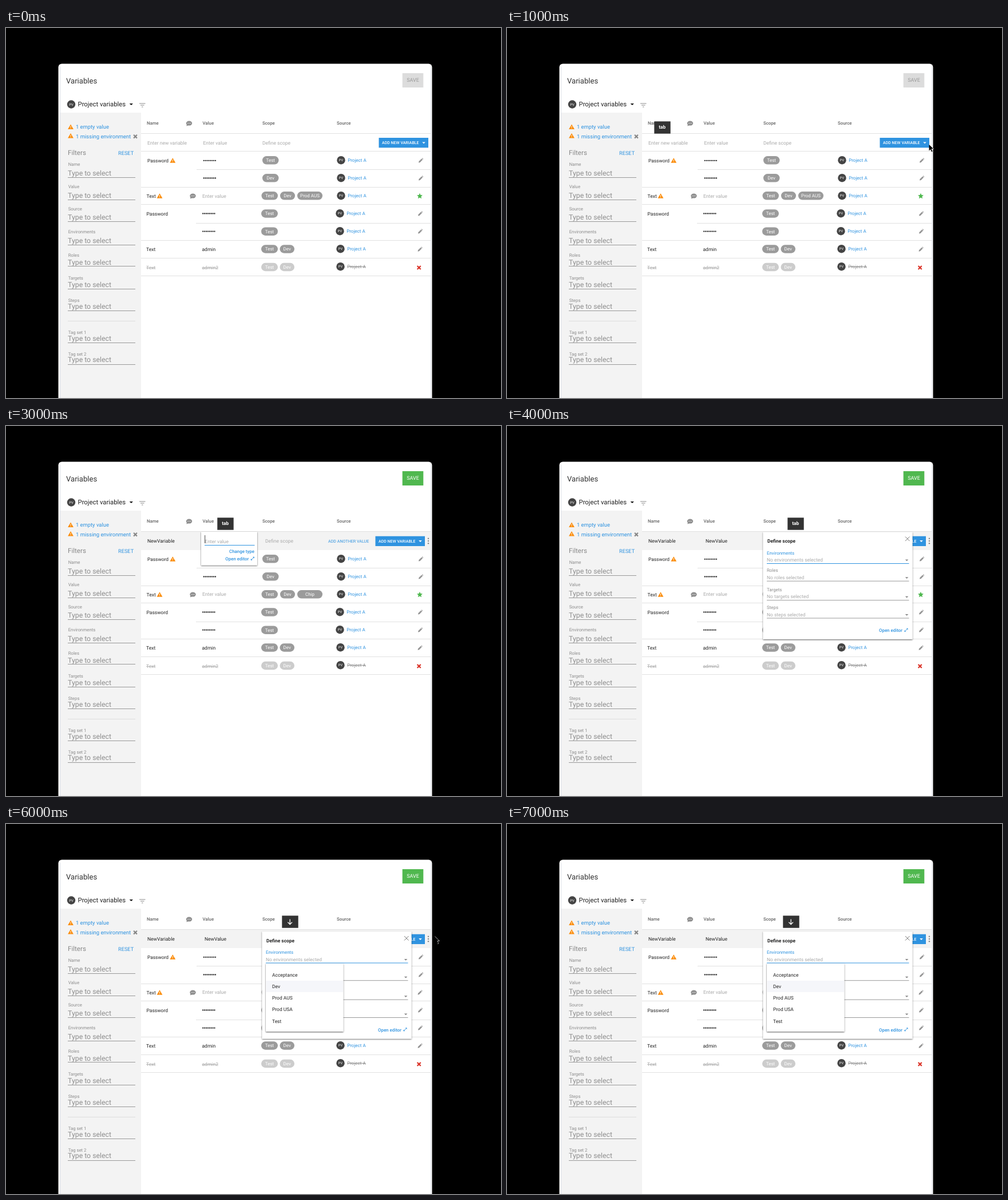
These frames come from a looping animation (865x647 px, 8 s). An HTML page:

```html
<!DOCTYPE html>
<html lang="en">
<head>
<meta charset="utf-8">
<title>Variables</title>
<style>
html, body { margin: 0; width: 100%; height: 100%; overflow: hidden; background: #000; }
svg { display: block; width: 865px; height: 647px; font-family: Roboto, sans-serif; }
text { text-rendering: geometricPrecision; }
</style>
</head>
<body>
<svg id="stage" viewBox="0 0 865 647"></svg>
<script>
const BLUE = '#2f93e0', INK = '#333', GREY = '#9b9b9b', PALE = '#aaa', RULE = '#e1e1e1';
const LOOP = 8000, STEP = 1000;

// Drawing helpers, all returning SVG markup
const text = (x, y, s, size = 8.5, fill = '#222', extra = '') =>
  `<text x="${x}" y="${y}" font-size="${size}" fill="${fill}" ${extra}>${s}</text>`;
const rect = (x, y, w, h, fill, extra = '') =>
  `<rect x="${x}" y="${y}" width="${w}" height="${h}" fill="${fill}" ${extra}/>`;
const path = (d, fill, extra = '') => `<path d="${d}" fill="${fill}" ${extra}/>`;
const stroke = (d, color, w = 1) => path(d, 'none', `stroke="${color}" stroke-width="${w}"`);
const rule = (x1, x2, y, color = RULE) => stroke(`M${x1} ${y}H${x2}`, color);
const dot = (x, y, r, fill) => `<circle cx="${x}" cy="${y}" r="${r}" fill="${fill}"/>`;
const move = (x, y, s) => `<g transform="translate(${x} ${y})">${s}</g>`;
const during = (from, to, s) => `<g data-from="${from}" data-to="${to}">${s}</g>`;
const MEDIUM = 'font-weight="500"', BOLD = 'font-weight="700"', MID = 'text-anchor="middle" ';
const SHADOW = 'filter="url(#shadow)"';

// Icons
const caret = (x, y, w, fill) => path(`M${x - w} ${y - w / 2}h${2 * w}l${-w} ${w}z`, fill);
const cross = (x, y, r, color, w) =>
  stroke(`M${x - r} ${y - r}l${2 * r} ${2 * r}m0 ${-2 * r}l${-2 * r} ${2 * r}`, color, w);
const warning = (x, y) => move(x, y,
  path('M0-4.4L4.9 4H-4.9z', '#fb8c0a') + stroke('M0-1.6V1.3M0 2V2.9', '#fff', .9));
const comment = (x, y) => move(x, y,
  `<ellipse cy="-.4" rx="5.2" ry="4" fill="#8f8f8f"/>` + path('M-4 1L-4.6 4.4L-1 3z', '#8f8f8f') +
  [-2.3, 0, 2.3].map(i => dot(i, -.4, .7, '#fff')).join(''));
const pencil = (x, y) => move(x, y,
  path('M-4 4L-3.4 1.5L1.2-3.1L3.1-1.2L-1.5 3.4zM1.8-3.7L2.6-4.3L4.3-2.6L3.7-1.8z', '#8f8f8f') +
  stroke('M-2.4 1.9L1.4-1.9', '#bbb', .5));
const star = (x, y) => {
  const pts = Array.from({ length: 10 }, (_, i) => {
    const r = i % 2 ? 2.4 : 5.2, a = i * Math.PI / 5;
    return (x + r * Math.sin(a)).toFixed(1) + ',' + (y - r * Math.cos(a)).toFixed(1);
  });
  return `<polygon points="${pts.join(' ')}" fill="#4fb84f"/>`;
};
const expand = (x, y) => move(x, y,
  path('M.3-3H3V-.3zM-.3 3H-3V.3z', BLUE) + stroke('M-2.2 2.2L2.2-2.2', BLUE, 1));
const badge = (x, y) => dot(x, y, 7.2, '#444') + text(x, y + 2.1, 'PV', 5.8, '#fff', MID);
const dots = (x, y) =>
  Array.from({ length: 8 }, (_, i) => dot(x + 1.2 + i * 2.9, y, 1.15, '#222')).join('');
const chip = (x, y, w, s, fill = GREY) =>
  rect(x, y - 7.2, w, 14.4, fill, 'rx="7.2"') + text(x + w / 2, y + 2.9, s, 8, '#fff', MID);
const key = (x, s, y = 160) =>
  rect(x + .3, y + .3, 28.4, 21.4, '#333') +
  (s ? text(x + 14.2, y + 13.4, s, 8.4, '#fff', MID + BOLD)
     : stroke(`M${x + 14.2} ${y + 6.5}v9m-3.8-3.8l3.8 3.8l3.8-3.8`, '#fff', 1.3));
const pointer = (x, y) => move(x, y,
  path('M0 0V11L2.6 8.7L4.6 13.2L6.4 12.4L4.4 8H8z', '#000') +
  stroke('M0 0L8 8H4.4L6.4 12.4L4.6 13.2', '#ccc', .8));

function shell() {
  const save = (bg, fg) => rect(692.7, 79, 36.6, 25, bg) + text(711, 94.4, 'SAVE', 9, fg, MID);
  return rect(91.5, 62.5, 653, 600, '#fff', 'rx="6"') +
    stroke('M94.5 68V647M742.5 68V647', '#dfe4ec') +
    rect(95, 148, 141, 499, '#f3f3f3') +
    text(105, 96.9, 'Variables', 13.1, INK) +
    during(0, 3, save('#dcdcdc', '#999')) + during(3, 8, save('#50b84f', '#fff')) +
    badge(114, 133.5) + text(125.5, 137.2, 'Project variables', 11.3, '#222') +
    caret(218.8, 133.5, 3.2, '#111') +
    stroke('M233 132H243.5M235 135H241.5M237 138H239.5', '#888', 1.1);
}

function sidebar() {
  const fields = [
    ['Name', 238, 254, 261.5], ['Value', 277.5, 293, 300.5], ['Source', 316, 331, 338.5],
    ['Environments', 356, 371.5, 379.5], ['Roles', 397.5, 409.5, 416.5],
    ['Targets', 437.5, 448.5, 456.5], ['Steps', 476, 487, 494.5],
    ['Tag set 1', 532, 543, 550.5], ['Tag set 2', 570, 580, 588.5]];
  return warning(113, 173) + text(122, 176.4, '1 empty value', 9.4, BLUE) +
    warning(113, 188.5) + text(122, 192.7, '1 missing environment', 9.5, BLUE) +
    cross(226, 189.7, 2.9, '#888', 2.2) +
    text(108, 222, 'Filters', 11.6, '#888') + text(196, 221.5, 'RESET', 9.2, BLUE) +
    rule(108, 226, 512.5, '#ddd') +
    fields.map(([name, a, b, c]) => text(108.7, a + 2.8, name, 7.8, '#8c8c8c') +
      text(108, b + 4, 'Type to select', 12.3, '#8f8f8f') +
      rule(108, 226, c, '#999')).join('');
}

function entryRow() {
  const button = (x, y) => rect(x, y, 86.5, 17.3, BLUE) +
    text(x + 5.5, y + 11.2, 'ADD NEW VARIABLE', 7, '#fff', MEDIUM) +
    caret(x + 78.5, y + 8.8, 2.8, '#fff');
  const hint = (x, s) => text(x, 204.3, s, 8.5, PALE);
  const heads = [[246, 'Name'], [343.5, 'Value'], [448, 'Scope'], [578, 'Source']];
  return heads.map(([x, s]) => text(x, 169.2, s, 7.8, '#666', MEDIUM)).join('') +
    comment(320, 167) +
    during(0, 2, hint(247, 'Enter new variable') + hint(344.5, 'Enter value') +
      hint(448, 'Define scope') + button(651.5, 192)) +
    during(2, 8, rect(236, 185, 506, 32, '#f3f3f3') + button(645.5, 192.7) +
      [196.8, 201, 205.2].map(y => dot(738, y, 1.2, '#888')).join('')) +
    during(2, 4, hint(453, 'Define scope') +
      text(563, 203.7, 'ADD ANOTHER VALUE', 7.15, BLUE)) +
    during(2, 3, hint(347, 'Enter value')) +
    during(3, 8, text(247, 204.3, 'NewVariable', 8.5)) +
    during(4, 8, text(347, 204.3, 'NewValue', 8.5)) +
    rule(236, 742, 184.5);
}

function rows() {
  const sources = [585.5, 585.5, 585.5, 583.5, 583.5, 584.5, 584.5];
  const struck = 'text-decoration="line-through"';
  const pair = (y, fill) => chip(446, y, 29, 'Test', fill) + chip(478.5, y, 25.5, 'Dev', fill);
  const lines = [[236, 215.5], [333, 247.5], [236, 278.5], [236, 308.5], [332, 341.5],
    [236, 371.5], [236, 402.5], [236, 433.5]];
  return lines.map(([x, y]) => rule(x, 742, y)).join('') +
    sources.map((x, i) => {
      const y = 231.2 + 31 * i, gone = i === 6;
      return badge(x, y) + text(x + 11.7, y + 2.6, 'Project A', 8, gone ? '#888' : BLUE, gone ? struck : '');
    }).join('') +
    text(247, 235.3, 'Password', 8.4) + warning(291.3, 231.7) +
    text(245.5, 297, 'Text', 8.5) + warning(268.5, 293.7) + comment(326.5, 294) +
    text(245.5, 328, 'Password', 8.5) + text(245, 390.3, 'Text', 8.5) +
    text(245, 422, 'Text', 8.5, PALE, struck) +
    dots(344.5, 231.8) + dots(344.5, 262.5) + dots(343, 324.5) + dots(343, 355.7) +
    text(342.5, 390.3, 'admin', 8.5) + text(342.5, 422, 'admin2', 8.5, PALE, struck) +
    chip(448, 231.3, 28.5, 'Test') + chip(448, 262.3, 28.5, 'Dev') +
    chip(446.5, 293.3, 28.5, 'Test') + chip(479, 293.3, 26, 'Dev') +
    during(0, 3, chip(509, 293.3, 44, 'Prod AUS')) + during(3, 8, chip(509, 293.3, 44, 'Chip')) +
    chip(446, 324.5, 29, 'Test') + chip(446, 355.7, 29, 'Test') +
    pair(386.5) + pair(418, '#ccc') +
    pencil(725, 231.5) + pencil(725, 262.5) +
    during(0, 5, star(723, 294)) + during(5, 8, pencil(723.5, 293.5)) +
    pencil(724, 324.5) + pencil(724, 355.5) + pencil(723.5, 386.8) +
    cross(721.7, 419, 3, '#db3328', 2.3);
}

function editor(x, h, hint) {
  return rect(x, 185, 98, h, '#fff', SHADOW) +
    text(x + 6.3, 204.5, hint, 8.5, PALE) + rule(x + 6, x + 93.5, 208.5, BLUE) +
    stroke(`M${x + 6.7} 191V205`, '#444', 1);
}
const openEditor = (x, y) => text(x, y, 'Open editor', 7.9, BLUE, MEDIUM) + expand(x + 47.5, y - 3.2);

function scopePanel() {
  const fields = [['Environments', 224.5], ['Roles', 255.2], ['Targets', 288.7], ['Steps', 320]];
  return rect(447.5, 185.5, 261, 187.5, '#fff', SHADOW) +
    text(455, 204, 'Define scope', 8.4, '#222', BOLD) + cross(699.8, 197.3, 3.8, '#777', 1) +
    fields.map(([name, y], i) =>
      text(454, y, name, 7.9, i ? '#8c8c8c' : BLUE) +
      text(454, y + 12.6, `No ${name.toLowerCase()} selected`, 8.45, PALE) +
      rule(454, 702.5, y + 16, i ? '#999' : BLUE) + caret(698.6, y + 10.4, 2.8, '#888')).join('') +
    openEditor(650, 360);
}

function menu() {
  const names = ['Acceptance', 'Dev', 'Prod AUS', 'Prod USA', 'Test'];
  return rect(454, 244, 135.5, 119, '#fff', SHADOW) +
    during(6, 8, rect(454.5, 274, 134.5, 20, '#f5f6fa')) +
    names.map((s, i) => text(465, 266.8 + 20.2 * i, s, 8.45)).join('');
}

const stage = document.getElementById('stage');
stage.innerHTML =
  `<defs><filter id="shadow" x="-10%" y="-10%" width="120%" height="125%">
    <feDropShadow dx="0" dy="1" stdDeviation="1.1" flood-color="#000" flood-opacity=".65"/>
  </filter></defs>` +
  rect(0, 0, 865, 647, '#000') + shell() + sidebar() +
  `<g id="rows">${rows()}</g>` + text(343, 296.5, 'Enter value', 8.5, PALE) + entryRow() +
  during(2, 3, editor(241, 40, 'Enter name') + openEditor(281.7, 220)) +
  during(3, 4, editor(341, 58.5, 'Enter value') +
    text(390, 222.3, 'Change type', 7.9, BLUE, MEDIUM) + openEditor(383.3, 235)) +
  during(4, 5, scopePanel()) +
  during(5, 8, move(0, 2.5, scopePanel()) + menu()) +
  during(1, 2, key(257, 'tab', 163) + pointer(737.5, 203.5)) +
  during(2, 3, key(257, 'type')) + during(3, 4, key(369, 'tab')) + during(4, 5, key(490, 'tab')) +
  during(5, 6, key(495)) + during(6, 8, key(482)) +
  during(5, 7, pointer(749.5, 196.5));

const timed = [...stage.querySelectorAll('[data-from]')];
const list = document.getElementById('rows');
const shifts = [0, 0, 1.5, 1, 1, 1, 1, 1];

function draw() {
  const step = Math.floor(performance.now() % LOOP / STEP);
  for (const g of timed) {
    const on = step >= +g.dataset.from && step < +g.dataset.to;
    g.setAttribute('display', on ? 'inline' : 'none');
  }
  list.setAttribute('transform', `translate(0 ${shifts[step]})`);
  requestAnimationFrame(draw);
}
draw();
</script>
</body>
</html>
```
